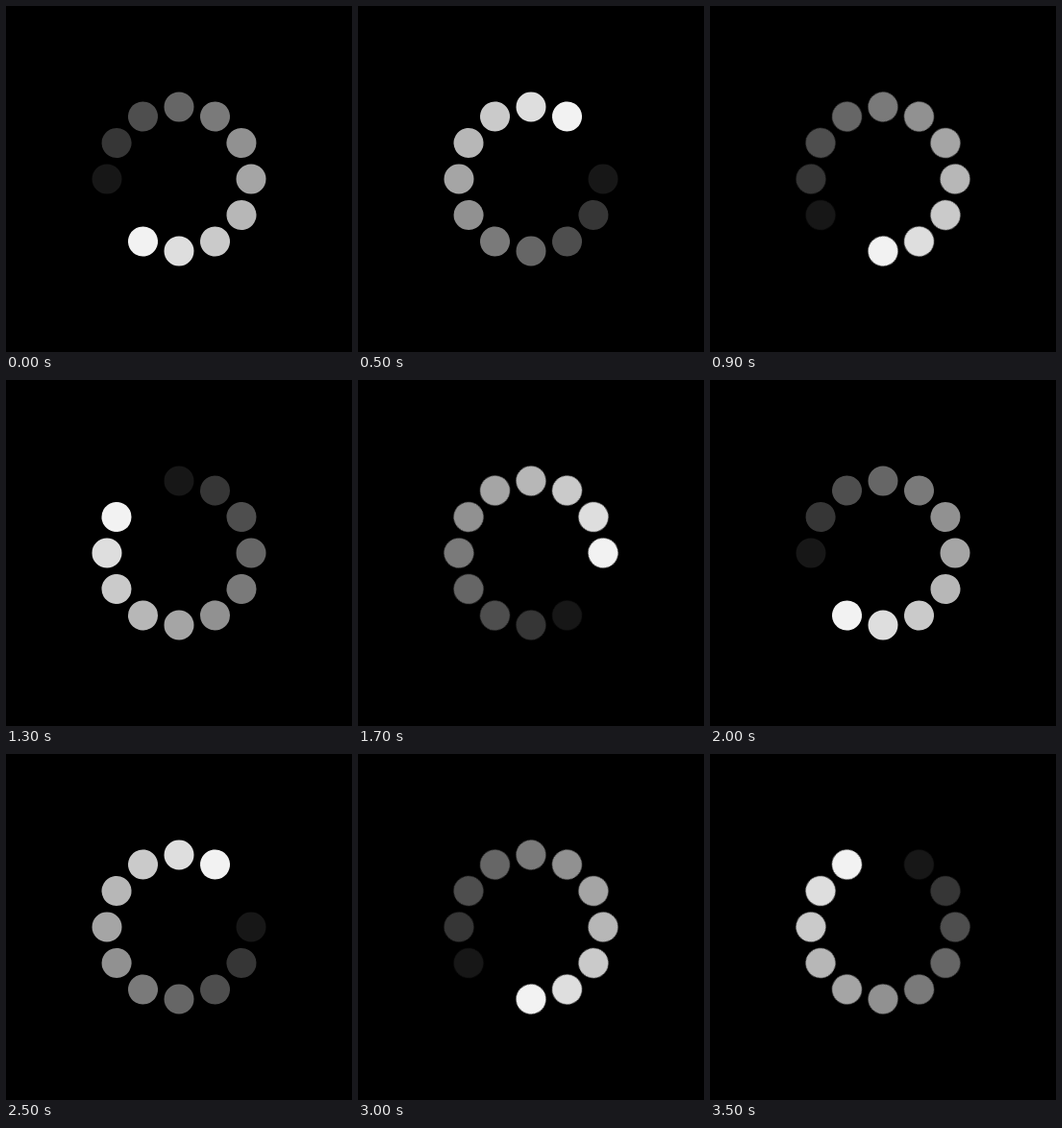
An HTML page without scripts for the animation above (3.6 s loop, 360 by 360 pixels).

```html
<!DOCTYPE html>
<html lang="en">
<head>
<meta charset="utf-8">
<title>Loading spinner</title>
<style>
  html, body {
    margin: 0;
    width: 100%;
    height: 100%;
    overflow: hidden;
    background: #000;
  }
  svg {
    display: block;
    width: 100vw;
    height: 100vh;
  }
  .turn { animation: turn 3.6s steps(36) -2ms infinite; }
  .skip { animation: skip 3.6s step-end -2ms infinite; }

  /* one place every 100 ms */
  @keyframes turn {
    from { transform: rotate(0deg); }
    to { transform: rotate(1080deg); }
  }
  /* one extra place now and then */
  @keyframes skip {
    0% { transform: rotate(0deg); }
    11.111% { transform: rotate(30deg); }
    25% { transform: rotate(60deg); }
    38.889% { transform: rotate(90deg); }
    52.778% { transform: rotate(120deg); }
    66.667%, 100% { transform: rotate(150deg); }
  }
</style>
</head>
<body>
<svg viewBox="-180 -180 360 360" role="img" aria-label="Loading">
  <defs>
    <circle id="dot" cy="-75" r="15.5"/>
  </defs>
  <g class="turn">
    <g class="skip">
      <use href="#dot" fill="#f2f2f2" transform="rotate(210)"/>
      <use href="#dot" fill="#dedede" transform="rotate(180)"/>
      <use href="#dot" fill="#cacaca" transform="rotate(150)"/>
      <use href="#dot" fill="#b7b7b7" transform="rotate(120)"/>
      <use href="#dot" fill="#a5a5a5" transform="rotate(90)"/>
      <use href="#dot" fill="#919191" transform="rotate(60)"/>
      <use href="#dot" fill="#7a7a7a" transform="rotate(30)"/>
      <use href="#dot" fill="#666" transform="rotate(0)"/>
      <use href="#dot" fill="#4e4e4e" transform="rotate(-30)"/>
      <use href="#dot" fill="#363636" transform="rotate(-60)"/>
      <use href="#dot" fill="#171717" transform="rotate(-90)"/>
    </g>
  </g>
</svg>
</body>
</html>
```
